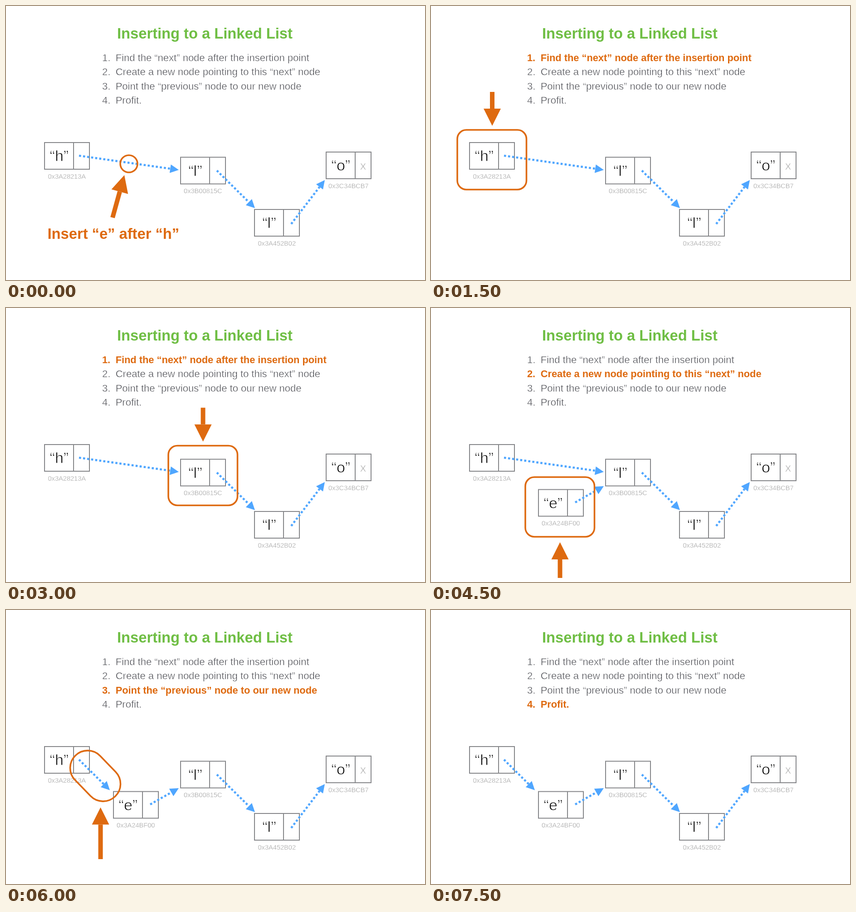
An HTML page that plays this animation: 924 by 606 pixels, repeating every 9 s.

```html
<!DOCTYPE html>
<html lang="en">
<head>
<meta charset="utf-8">
<title>Inserting to a Linked List</title>
<style>
  html, body { margin: 0; width: 100%; height: 100%; overflow: hidden; background: #fff; }
  svg { display: block; font-family: "Liberation Sans", Arial, sans-serif; }
  text { white-space: pre; }
  /* A thin white outline slims the regular weight to a light one. */
  .light { stroke: #fff; stroke-width: .5; }
  .item { font-size: 22px; fill: #4b4c52; }
  .item.active { font-size: 21.8px; font-weight: bold; fill: #de6a10; stroke: none; }
  .heading { font-size: 32.7px; font-weight: bold; }
  .letter { font-size: 34px; fill: #000; text-anchor: middle; stroke-width: .9; }
  .address { font-size: 14.6px; fill: #a6a6a6; text-anchor: middle; stroke-width: .3; }
  .nil { font-size: 20px; fill: #a0a0a0; text-anchor: middle; }
  .box { fill: none; stroke: #858689; stroke-width: 2; }
  .ring { fill: none; stroke: #de6a10; stroke-width: 3.6; }
</style>
</head>
<body>
<svg id="stage" width="924" height="606" viewBox="0 0 924 606"></svg>
<script>
const STEP_MS = 1500;
const ORANGE = "#de6a10", BLUE = "#4fa6ff", GREEN = "#6fbe44";
const steps = [
  "Find the “next” node after the insertion point",
  "Create a new node pointing to this “next” node",
  "Point the “previous” node to our new node",
  "Profit."
];

const text = (x, y, cls, content, fill) =>
  `<text x="${x}" y="${y}" class="${cls}"${fill ? ` fill="${fill}"` : ""}>${content}</text>`;

const list = active => steps.map((step, i) => {
  const cls = i === active ? "item active" : "item light";
  const y = 122 + i * 31.4;
  return text(212, y, cls, `${i + 1}.`) + text(241.7, y, cls, step);
}).join("");

const node = (x, y, letter, address) => `
  <path class="box" d="M${x + 1} ${y + 1}h99v59h-99zM${x + 65} ${y + 1}v59"/>
  ${text(x + 33.4, y + 42, "letter light", `“${letter}”`)}
  ${text(x + 50.3, y + 80.5, "address light", address)}`;

// An arrow from (x1, y1) whose tip touches (x2, y2).
function arrow(x1, y1, x2, y2, color, shaft, head, width, dash = "") {
  const length = Math.hypot(x2 - x1, y2 - y1);
  const angle = Math.atan2(y2 - y1, x2 - x1) * 180 / Math.PI;
  const neck = length - head;
  return `<g transform="translate(${x1} ${y1}) rotate(${angle})">
    <path d="M0 0H${neck}" stroke="${color}" stroke-width="${shaft}" stroke-dasharray="${dash}"/>
    <path d="M${neck} ${-width / 2}L${length} 0L${neck} ${width / 2}z" fill="${color}"/></g>`;
}
const link = (...ends) => arrow(...ends, BLUE, 4.6, 19, 19, "4.6 4.4");
const pointer = (...ends) => arrow(...ends, ORANGE, 10, 38, 38);
const frame = (x, y) =>
  `<rect class="ring" x="${x + 2}" y="${y + 2}" width="152.5" height="132" rx="20"/>`;

const base = text(245, 72, "heading", "Inserting to a Linked List", GREEN)
  + node(84, 301, "h", "0x3A28213A")
  + node(384, 333.5, "l", "0x3B00815C")
  + node(547, 449, "l", "0x3A452B02")
  + node(705, 322, "o", "0x3C34BCB7")
  + text(787.3, 362, "nil light", "X")
  + link(465, 364, 549, 447) + link(629, 482, 703, 385);

const direct = link(161, 331, 381, 362.5);
const created = node(236, 400.5, "e", "0x3A24BF00") + link(318, 430, 381, 394);
const detour = created + link(161, 331, 229, 398.5);

const scenes = [
  list() + direct
    + `<circle class="ring" cx="271" cy="349" r="19"/>`
    + pointer(235, 468, 261, 374)
    + text(91.5, 514.5, "heading", "Insert “e” after “h”", ORANGE),
  list(0) + direct + frame(56, 272) + pointer(135, 190, 135, 265),
  list(0) + direct + frame(356, 302.5) + pointer(434.5, 220.5, 434.5, 295.5),
  list(1) + direct + created + frame(206, 372) + pointer(284.5, 597, 284.5, 518),
  list(2) + detour
    + `<rect class="ring" x="-63" y="-38.5" width="126" height="77" rx="38.5"
        transform="translate(197 367) rotate(46)"/>`
    + pointer(208.5, 551, 208.5, 436.5),
  list(3) + detour
];

const stage = document.getElementById("stage");
let shown = -1;
function render(now) {
  const index = Math.floor(now / STEP_MS) % scenes.length;
  if (index !== shown) {
    shown = index;
    stage.innerHTML = base + scenes[index];
  }
}
let start;
function tick(now) {
  start ??= now;
  render(now - start);
  requestAnimationFrame(tick);
}
render(0);
requestAnimationFrame(tick);
</script>
</body>
</html>
```
